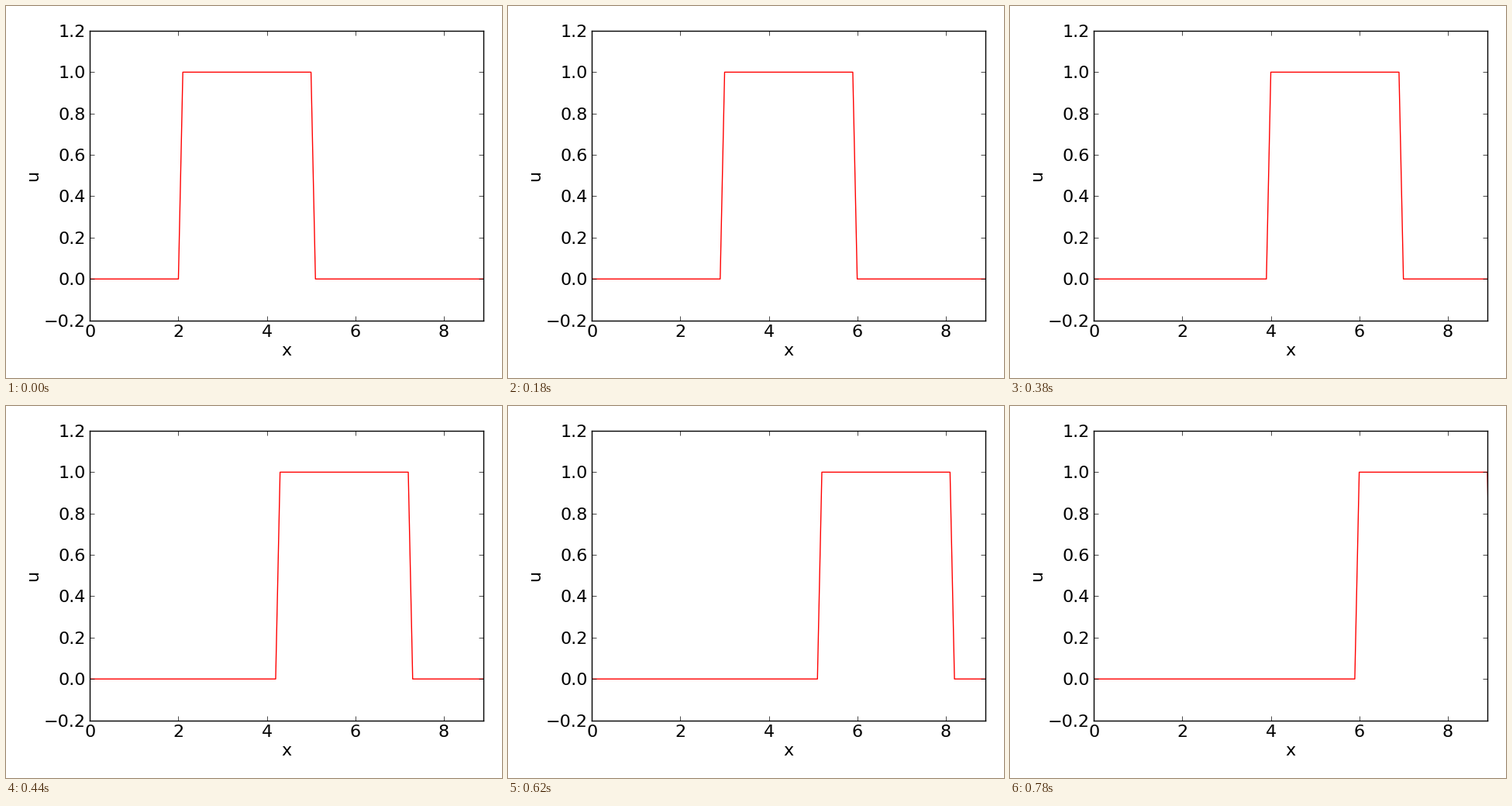
A matplotlib script for the animation above (0.8 s loop, 640 by 480 pixels).

```python
import matplotlib.pyplot as plt
from matplotlib.animation import FuncAnimation
from matplotlib.transforms import IdentityTransform

W, H = 640, 480
LEFT, RIGHT, TOP, BOTTOM = 108.4, 616.0, 32.0, 405.6
X_MAX, Y_MIN, Y_MAX = 8.9, -0.2, 1.2
FRAMES, INTERVAL, STEP = 40, 20, 0.1

plt.rcParams.update({
    "font.family": "DejaVu Sans",
    "font.size": 16,
    "axes.linewidth": 1.0,
    "axes.axisbelow": False,
})

fig = plt.figure(figsize=(W / 100, H / 100), dpi=100, facecolor="white")
ax = fig.add_axes([LEFT / W, 1 - BOTTOM / H,
                   (RIGHT - LEFT) / W, (BOTTOM - TOP) / H])
ax.set_xlim(0, X_MAX)
ax.set_ylim(Y_MIN, Y_MAX)

x_ticks = [0, 2, 4, 6, 8]
y_ticks = [round(Y_MIN + 0.2 * i, 1) for i in range(8)]
ax.set_xticks(x_ticks)
ax.set_yticks(y_ticks)
ax.tick_params(direction="in", length=4, width=0.5, top=True, right=True,
               labelbottom=False, labelleft=False)


def label(x, baseline, text, ha="center", rotation=0):
    """Place text by its baseline, in pixels from the top left."""
    fig.text(x, H - baseline, text, ha=ha, va="baseline", rotation=rotation,
             rotation_mode="anchor", transform=IdentityTransform())


for v in x_ticks:
    label(LEFT + (RIGHT - LEFT) * v / X_MAX, 427, str(v))
for v in y_ticks:
    y = TOP + (BOTTOM - TOP) * (Y_MAX - v) / (Y_MAX - Y_MIN)
    label(LEFT - 5.5, y + 8, f"{v:.1f}".replace("-", "\u2212"), ha="right")
label((LEFT + RIGHT) / 2, 451, "x")
label(41, (TOP + BOTTOM) / 2, "u", rotation=90)

line, = ax.plot([], [], color="red", lw=1.0)


def update(i):
    s = STEP * i
    line.set_data([0, 2 + s, 2.1 + s, 5 + s, 5.1 + s, 10],
                  [0, 0, 1, 1, 0, 0])
    return line,


anim = FuncAnimation(fig, update, frames=FRAMES, interval=INTERVAL,
                     init_func=lambda: update(0), repeat=True,
                     repeat_delay=0, blit=False)
plt.show()
```
